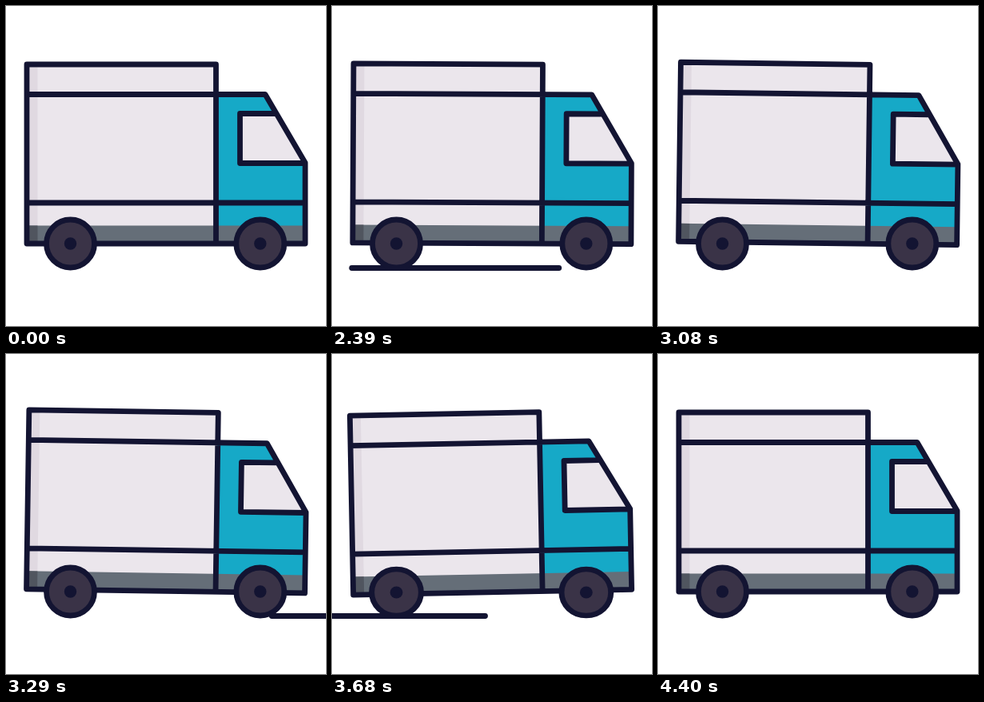
An HTML page that plays this animation: 400 by 400 pixels, repeating every 4.43 s.

```html
<!DOCTYPE html>
<html lang="en">
<head>
<meta charset="utf-8">
<title>Truck</title>
<style>
  html, body { margin: 0; width: 100%; height: 100%; overflow: hidden; background: #fff; }
  svg { display: block; width: 100%; height: 100%; }
  .ink { fill: none; stroke: #131432; stroke-width: 6.8; stroke-linecap: round; stroke-linejoin: round; }
</style>
</head>
<body>
<svg viewBox="0 0 400 400">
  <defs>
    <g id="wheel">
      <circle class="ink" cy="-32" r="30" style="fill:#3a3347"/>
      <circle cy="-32" r="7.7" fill="#131432"/>
    </g>
  </defs>
  <path id="road" class="ink" d="M0 327.500H259"/>
  <g id="body">
    <path fill="#ebe6ec" d="M26 73H262V297H26Z"/>
    <path fill="#e0d9e1" d="M26 73H39.500V297H26Z"/>
    <path fill="#16a9c7" d="M262 110.500H324L374 196V297H262Z"/>
    <path fill="#ebe6ec" d="M336 134.500H292.500V196.500H374Z"/>
    <path fill="#656e78" d="M26 274.500H374V297H26Z"/>
    <path fill="#50555f" d="M26 274.500H39.500V297H26Z"/>
    <path class="ink" d="M262.500 110.500V73H26V297H374V196L324 110.500H26M262.500 110.500V297M26 246H374M336 134.500H292.500V196.500H374"/>
  </g>
  <use class="wheel" href="#wheel" data-x="80.5"/>
  <use class="wheel" href="#wheel" data-x="317.8"/>
</svg>
<script>
  const LOOP = 4430;
  const road = document.getElementById('road');
  const body = document.getElementById('body');
  const wheels = document.querySelectorAll('.wheel');

  // Body tilt keys: [ms, degrees]
  const tiltKeys = [
    [0, 0], [2010, 0], [2250, .85], [2680, -1.48], [3130, .8],
    [3340, .85], [3800, -1.46], [4300, 0], [LOOP, 0]
  ];

  function tiltAt(t) {
    const i = tiltKeys.findIndex(key => key[0] > t);
    const [t0, a] = tiltKeys[i - 1], [t1, b] = tiltKeys[i];
    return a + (b - a) * (1 - Math.cos(Math.PI * (t - t0) / (t1 - t0))) / 2;
  }

  function draw(t) {
    const tilt = tiltAt(t);
    body.setAttribute('transform', `rotate(${tilt} 240 265)`);

    // Wheels flatten while the body leans back
    const squash = Math.max(0, -tilt) / 1.5;
    for (const wheel of wheels) {
      wheel.setAttribute('transform',
        `translate(${wheel.dataset.x} 329) scale(${1 + .04 * squash} ${1 - .045 * squash})`);
    }

    // The road line sweeps past twice
    const start = t < 3220 ? 2020 : 3220;
    road.setAttribute('transform', `translate(${405 - 1.025 * (t - start)})`);
    road.style.display = t < start ? 'none' : '';
  }

  function frame() {
    draw(performance.now() % LOOP);
    requestAnimationFrame(frame);
  }
  frame();
</script>
</body>
</html>
```
